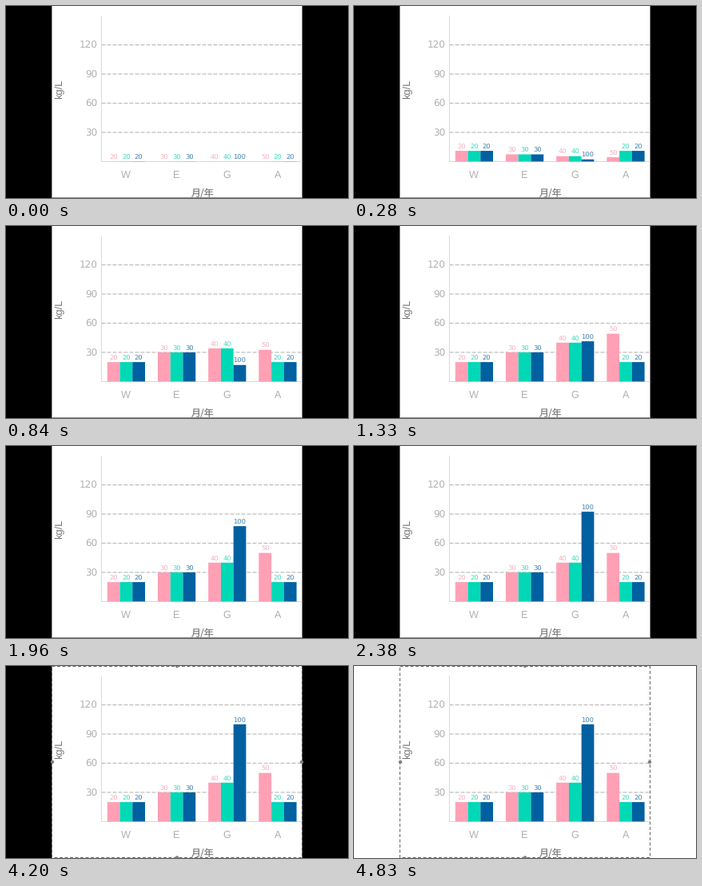
Write a matplotlib script that moves like this. It is 428 by 240 pixels and loops after 5250 ms.

```python
import matplotlib.pyplot as plt
from matplotlib.animation import FuncAnimation
from matplotlib.patches import Circle, Rectangle

W, H, DPI = 428, 240, 100
STEP, FRAMES = 70, 75
LEFT, RIGHT = 57.4, 370.6
SELECT_AT, CLEAR_AT = 4200, 4830
BASE, UNIT = 194.4, 1.215          # zero line and pixels per unit
BAR, PITCH, CENTER = 15.75, 63.2, 150.4

GROUPS = {"W": (20, 20, 20), "E": (30, 30, 30),
          "G": (40, 40, 100), "A": (50, 20, 20)}
FILLS = ("#ffa0b5", "#00d8b6", "#0060a0")
INKS = ("#f6b0c2", "#3fdcc0", "#3f80b0")
DIGITS = "DejaVu Sans"

plt.rcParams["text.hinting"] = "none"
plt.rcParams["lines.scale_dashes"] = False
plt.rcParams["font.family"] = "Liberation Sans"

fig = plt.figure(figsize=(W / DPI, H / DPI), dpi=DPI, facecolor="black")
ax = fig.add_axes([0, 0, 1, 1])
ax.set(xlim=(0, W), ylim=(H, 0))
ax.axis("off")


def pt(px):
    return px * 72 / DPI


def rect(x, y, w, h, color, z):
    return ax.add_patch(Rectangle((x, y), w, h, fc=color, lw=0, zorder=z,
                                  snap=False))


def line(xs, ys, color, width=1, dash=None, z=2):
    style = (0, [pt(d) for d in dash]) if dash else "-"
    return ax.plot(xs, ys, color=color, lw=pt(width), ls=style, zorder=z,
                   dash_capstyle="butt", solid_capstyle="butt",
                   snap=False)[0]


def label(x, y, text, size, color, ha="center", **kw):
    kw.setdefault("va", "baseline")
    return ax.text(x, y, text, fontsize=pt(size), color=color, ha=ha,
                   zorder=5, **kw)


def ease(t):
    t = min(max(t, 0), 1)
    return 2 * t * t if t < 0.5 else 1 - 2 * (1 - t) ** 2


panel = rect(LEFT, 0, RIGHT - LEFT, H, "white", 0)
edge = line([LEFT, RIGHT], [239.5, 239.5], "#8c8c8c")

# Axes, grid and titles
for v in (30, 60, 90, 120):
    y = BASE - v * UNIT
    line([119.5, 370.5], [y, y], "#bdbdbd", 1.2, (5, 2), z=1)
    label(114.6, y + 4.5, str(v), 12, "#b2b2b2", ha="right", family=DIGITS)
line([119.4, 119.4], [12, 195], "#d8d8d8")
line([119, 370.5], [194.5, 194.5], "#d8d8d8")
label(67, 103.5, "kg/L", 12.9, "#787878", va="center", rotation=90)
label(246.2, 237.5, "月/年", 12, "#808080", family="Noto Sans CJK JP",
      weight="light")

bars = []
for g, (name, values) in enumerate(GROUPS.items()):
    mid = CENTER + g * PITCH
    label(mid - 0.2, 215, name, 12.6, "#b0b0b0")
    for i, v in enumerate(values):
        x = mid + (i - 1.5) * BAR
        bars.append((v, rect(x, BASE, BAR, 0, FILLS[i], 3),
                     label(x + BAR / 2, BASE, str(v), 8.4, INKS[i],
                           family=DIGITS)))

# Selection outline with its handles
frame = [line([57.5, 370.5, 370.5, 57.5, 57.5], [0.5, 0.5, 239.5, 239.5, 0.5],
              "#686868", 1, (4, 2.5), z=6)]
for x, y in ((214, 0), (214, 239.5), (58, 120), (370, 120)):
    frame.append(ax.add_patch(Circle((x, y), 2.2, fc="#808080", lw=0, zorder=7)))


def update(n):
    now = n * STEP
    for v, bar, text in bars:
        height = v * UNIT * ease((now + 35) / (30 * v))
        bar.set_y(BASE - height)
        bar.set_height(height)
        text.set_y(BASE - height - 2.4)
    selected = now >= SELECT_AT
    edge.set_visible(not selected)
    for part in frame:
        part.set_visible(selected)
    fig.set_facecolor("white" if now >= CLEAR_AT else "black")
    return []


anim = FuncAnimation(fig, update, frames=FRAMES, interval=STEP,
                     repeat=True, repeat_delay=0, blit=False)
plt.show()
```
